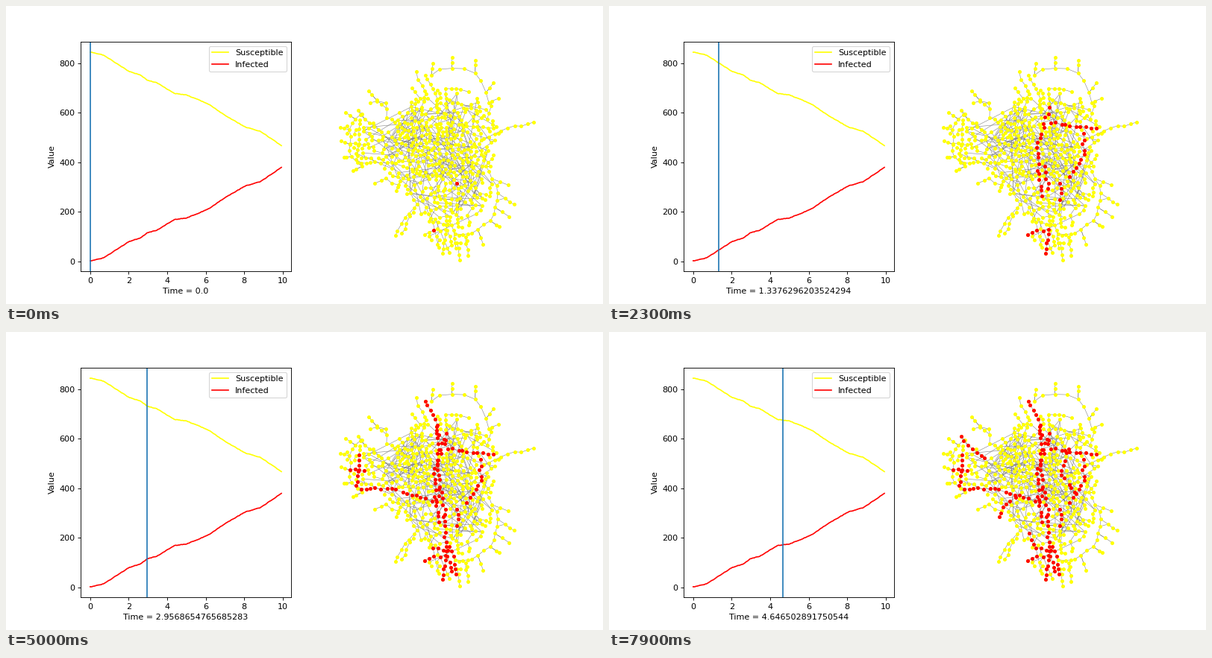
A matplotlib script for the animation above (8 s loop, 800 px wide and 400 px high).

```python
import matplotlib.pyplot as plt
import numpy as np
from matplotlib.animation import FuncAnimation
from matplotlib.collections import LineCollection

FRAMES, INTERVAL = 80, 100
STEP = 0.07040155896591734
STEPS = 141
POPULATION, SHOWN = 846, 640
CENTRE = np.array([585, 200])
NEVER = 10**6

rng = np.random.default_rng(4)
nodes, caught, edges, roots = [], [], [], []


def add_node(p, step=NEVER):
    nodes.append(np.asarray(p, float))
    caught.append(step)
    return len(nodes) - 1


def chain(pts, gap=7.5, first=NEVER, last=NEVER):
    """Link nodes along a polyline, infected in turn from first to last step."""
    pts = np.array(pts, float)
    dist = np.r_[0, np.cumsum(np.hypot(*np.diff(pts, axis=0).T))]
    n = max(2, round(dist[-1] / gap) + 1)
    at = np.linspace(0, dist[-1], n)
    xy = np.c_[np.interp(at, dist, pts[:, 0]), np.interp(at, dist, pts[:, 1])]
    xy[1:-1] += rng.uniform(-2, 2, (n - 2, 2))
    steps = np.linspace(first, last, n).round()
    ids = [add_node(p, s) for p, s in zip(xy, steps)]
    roots.append(ids[0])
    edges.extend(zip(ids, ids[1:]))
    return ids


def spurs(ids):
    """Grow short twigs outwards from every other node of a chain."""
    for i in ids[1::2]:
        out = nodes[i] - CENTRE
        out = out / np.hypot(*out) + rng.uniform(-.35, .35, 2)
        twig = chain([nodes[i] + 9 * out, nodes[i] + rng.uniform(12, 21) * out], 9)
        edges.append((i, twig[0]))


def arc(cx, cy, rx, ry, start, end):
    a = np.radians(np.linspace(start, end, 30))
    return np.c_[cx + rx * np.cos(a), cy + ry * np.sin(a)]


# Routes of the infection: first step, last step, way points
ROUTES = [
    (0, 10, (604, 238), (604, 260)),
    (0, 6, (573, 301), (561, 307)),
    (3, 12, (617, 229), (635, 201), (636, 171)),
    (2, 12, (582, 302), (590, 301), (585, 332)),
    (8, 13, (588, 245), (584, 215)),
    (14, 19, (580, 255), (572, 190), (590, 136)),
    (15, 19, (592, 157), (653, 164)),
    (20, 32, (577, 228), (513, 210), (471, 210), (473, 165)),
    (20, 29, (580, 220), (579, 155), (577, 127)),
    (22, 31, (586, 248), (589, 290), (597, 321)),
    (33, 40, (588, 150), (570, 112), (562, 93)),
    (33, 40, (480, 186), (461, 185)),
    (33, 42, (594, 288), (600, 308), (603, 325)),
    (34, 49, (592, 293), (569, 290), (563, 270)),
    (51, 60, (545, 222), (532, 230), (523, 248)),
    (52, 62, (472, 140), (480, 153), (503, 169)),
    (53, 64, (624, 215), (606, 190), (616, 157)),
]
for first, last, *way in ROUTES:
    chain(way, 7, first, last)

# Outer branches
spurs(chain(arc(600, 130, 47, 48, 0, -130), 15))
spurs(chain(arc(612, 255, 46, 52, -40, 75), 10))
spurs(chain(arc(480, 180, 20, 36, -100, -260), 9))
spurs(chain([(510, 150), (507, 128), (488, 130)], 10))
for branch in ([(640, 178), (674, 163), (707, 156)],
               [(561, 114), (550, 88)], [(560, 128), (544, 110)],
               [(645, 152), (650, 128), (660, 124)],
               [(526, 240), (511, 233), (494, 238)],
               [(551, 266), (536, 283), (522, 308)],
               [(546, 277), (530, 305)],
               [(604, 318), (608, 341)], [(616, 310), (619, 335)]):
    chain(branch, 9)

# Core: overlapping ellipses as x, y, half width, half height, weight
BLOBS = np.array([
    (592, 175, 70, 66, .40), (545, 188, 50, 48, .20),
    (593, 235, 60, 58, .23), (594, 300, 30, 36, .10), (476, 180, 24, 34, .07)])

core_start = len(nodes)
for attempt in range(20000):
    if len(nodes) == SHOWN:
        break
    x, y, w, h, _ = BLOBS[rng.choice(len(BLOBS), p=BLOBS[:, 4])]
    a, r = rng.uniform(0, 2 * np.pi), rng.random() ** .65
    p = np.array([x + w * r * np.cos(a), y + h * r * np.sin(a)])
    if np.hypot(*(np.array(nodes) - p).T).min() > 4.5:
        roots.append(add_node(p))

nodes, caught = np.array(nodes), np.array(caught)
depth = np.hypot(*(nodes - CENTRE).T)
for i in roots:
    inner = np.flatnonzero(depth < depth[i])
    if inner.size:
        edges.append((i, inner[np.hypot(*(nodes[inner] - nodes[i]).T).argmin()]))
for a, b in rng.integers(core_start, len(nodes), (450, 2)):
    if 15 < np.hypot(*(nodes[a] - nodes[b])) < 75:
        edges.append((a, b))

# Infected count: key points joined by lines with a little noise
KEYS = np.array([
    (0, 2), (.7, 14), (2, 79), (2.65, 96), (2.95, 115), (3.45, 125),
    (4.35, 168), (5, 175), (5.8, 200), (6.25, 217), (7, 257), (8.05, 304),
    (8.85, 322), (9.93, 379)])
times = np.arange(STEPS + 1) * STEP
infected = np.interp(times, *KEYS.T) + rng.uniform(-1, 1, times.size)

fig = plt.figure(figsize=(10, 5), dpi=80, facecolor="white")
plot = fig.add_subplot(1, 2, 1)
plot.plot(times, POPULATION - infected, color="yellow", label="Susceptible")
plot.plot(times, infected, color="red", label="Infected")
plot.set_ylabel("Value")
plot.legend(loc="upper right")
marker = plot.axvline(0)

net = fig.add_axes([0, 0, 1, 1])
net.set(xlim=(0, 800), ylim=(400, 0))
net.axis("off")
net.add_collection(LineCollection([nodes[[a, b]] for a, b in edges],
                                  colors="0.5", linewidths=.5, zorder=1))
dot = dict(s=9, linewidths=1.5)
net.scatter(*nodes.T, color="yellow", zorder=2, **dot)
sick = net.scatter([], [], color="red", zorder=3, **dot)


def update(i):
    # Every sixth picture repeats the one before it
    k = (5 * i + 2) // 6
    t = k * STEP
    marker.set_xdata([t, t])
    plot.set_xlabel(f"Time = {t}")
    sick.set_offsets(nodes[caught <= k])
    return marker, sick


anim = FuncAnimation(fig, update, frames=FRAMES, interval=INTERVAL,
                     repeat=True, repeat_delay=0)
plt.show()
```
